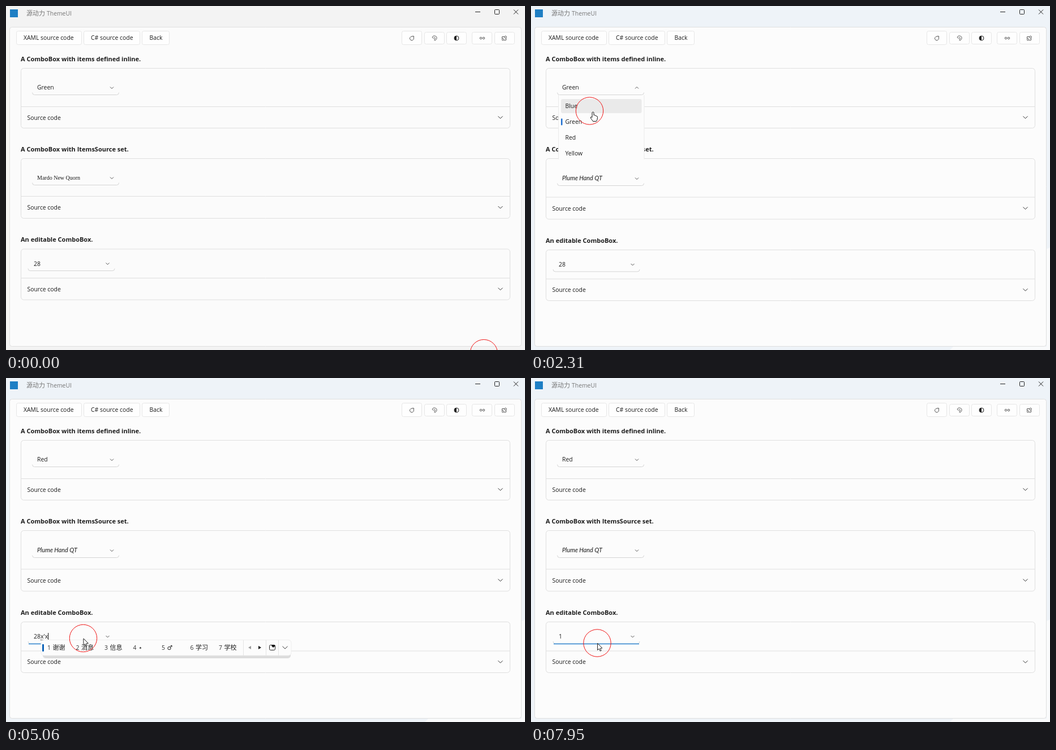
Animation, 917 px wide and 610 px high, one loop 8000 ms. Source, as an HTML page with a canvas:

```html
<!DOCTYPE html>
<html lang="en">
<head>
<meta charset="utf-8">
<title>ComboBox demo</title>
<style>
html, body { margin: 0; width: 100%; height: 100%; overflow: hidden; background: #f3f3f3; }
canvas { display: block; width: 917px; height: 610px; }
</style>
</head>
<body>
<canvas id="stage" width="917" height="610"></canvas>
<script>
const ctx = document.getElementById('stage').getContext('2d');
const LOOP = 8000;
const UI = '10.4px "Open Sans", sans-serif';
const BOLD = 'bold 11px "Open Sans", sans-serif';
const CJK = '11px "Noto Sans CJK SC", "Noto Sans CJK", sans-serif';
const SERIF = '10px "Liberation Serif", serif';
const SCRIPT = 'italic 10.8px Lato, sans-serif';
const INK = '#1c1c1c', LINE = '#dfdfdf', BLUE = '#2f87d3';

const colors = ['Blue', 'Green', 'Red', 'Yellow'].map(s => ({ s, font: UI }));
const fonts = [
  { s: 'Ovald', font: UI },
  { s: 'Plume Hand QT', font: SCRIPT },
  { s: 'Tallow Code', font: '10px "Liberation Mono", monospace' },
  { s: 'Kestra UI', font: UI },
  { s: 'Mardo New Quorn', font: SERIF }
];

// time, x, y of the pointer
const path = [
  [0, 845, 616], [200, 700, 556], [450, 300, 385], [680, 125, 309], [820, 116, 312],
  [1040, 108, 367], [1120, 108, 364], [1350, 113, 240], [1600, 113.5, 142.5],
  [1800, 113.5, 142.5], [2050, 108, 168], [2310, 103.5, 186], [2540, 104, 184],
  [2800, 115, 153], [2880, 114, 156], [3100, 104, 215], [3300, 101, 242], [3400, 101, 241],
  [3650, 118, 350], [3950, 135, 460], [4160, 132, 510], [4500, 130, 488],
  [5060, 136.5, 461.5], [5480, 118, 458], [5820, 18, 449], [6070, 18, 449],
  [6500, 62, 465], [6830, 99, 475], [6880, 101, 477.5], [7080, 119, 483],
  [7280, 119, 483], [7600, 118, 474], [7950, 117, 470], [8000, 117, 470]
];

// hover: [from time, row] pairs
const popups = [
  { y: 317, open: 730, close: 1080, items: fonts, pick: 4, hover: [[0, 4], [930, 0], [990, 1]] },
  { y: 157, open: 1740, close: 2550, items: colors, pick: 1, hover: [[0, 1], [2000, 0]] },
  { y: 157, open: 2830, close: 3420, items: colors, pick: 0, hover: [[0, 0], [3040, 1], [3190, 2]] }
];

const clamp = v => Math.max(0, Math.min(1, v));

function at(t) {
  let i = 1;
  while (i < path.length - 1 && path[i][0] < t) i++;
  const [t0, x0, y0] = path[i - 1], [t1, x1, y1] = path[i];
  const p = clamp((t - t0) / (t1 - t0));
  return { x: x0 + (x1 - x0) * p, y: y0 + (y1 - y0) * p };
}

function text(s, x, y, font = UI, color = INK) {
  ctx.font = font;
  ctx.fillStyle = color;
  ctx.fillText(s, x, y);
}

function line(points, color = LINE, width = 1) {
  ctx.beginPath();
  points.forEach(([x, y]) => ctx.lineTo(x, y));
  ctx.strokeStyle = color;
  ctx.lineWidth = width;
  ctx.stroke();
}

function box(x, y, w, h, r, fill, stroke) {
  ctx.beginPath();
  ctx.roundRect(x, y, w, h, r);
  if (fill) { ctx.fillStyle = fill; ctx.fill(); }
  if (stroke) { ctx.strokeStyle = stroke; ctx.lineWidth = 1; ctx.stroke(); }
}

function ring(x, y, r, color, width = 1, from = 0, to = Math.PI * 2) {
  ctx.beginPath();
  ctx.arc(x, y, r, from, to);
  ctx.strokeStyle = color;
  ctx.lineWidth = width;
  ctx.stroke();
}

function poly(points, fill, stroke) {
  ctx.beginPath();
  points.forEach(([x, y]) => ctx.lineTo(x, y));
  ctx.closePath();
  if (fill) { ctx.fillStyle = fill; ctx.fill(); }
  if (stroke) { ctx.strokeStyle = stroke; ctx.lineWidth = 1; ctx.stroke(); }
}

function chevron(x, y, w, h, color = '#444') {
  line([[x - w, y - h], [x, y + h], [x + w, y - h]], color);
}

function drawWindow(active) {
  ctx.fillStyle = active ? '#eef3f8' : '#f3f3f3';
  ctx.fillRect(0, 0, 917, 610);
  if (active) poly([[917, 428], [911, 431], [911, 604], [746, 604], [740, 610], [917, 610]], '#f9fafb');
  box(6.5, 37.5, 904, 566, 4, active ? '#fcfcfc' : '#fbfbfb', LINE);

  ctx.fillStyle = '#1f7fc4';
  ctx.fillRect(7, 6, 14, 14);
  text('源动力', 36, 17, CJK, '#777');
  text('ThemeUI', 72, 16.5, UI, '#777');
  line([[829, 10.5], [838, 10.5]], '#222');
  box(863.5, 6.5, 8, 8, 1, null, '#222');
  line([[897, 6.5], [905, 14.5]], '#222');
  line([[905, 6.5], [897, 14.5]], '#222');
}

function drawToolbar() {
  const labels = [['XAML source code', 18.5, 115, 31], ['C# source code', 137.5, 99, 150], ['Back', 240.5, 48, 253.5]];
  for (const [s, x, w, tx] of labels) {
    box(x, 44.5, w, 24, 3, '#fefefe', '#e6e6e6');
    text(s, tx, 60);
  }
  [699.5, 739.5, 778.5, 823.5, 863.5].forEach((x, i) =>
    box(x, i ? 46.5 : 44.5, 35, i ? 21 : 24, 3, '#fefefe', '#e6e6e6'));

  const dark = '#555';
  ring(717, 57.5, 3.5, dark, 1, -0.5, 5);
  line([[717.5, 53.5], [720.5, 53.5], [720.5, 56]], dark);
  ring(757, 57, 4, dark, 1, -2.8, 1.7);
  ring(757, 57.5, 1.5, dark, 1, -2.5, 2.2);
  line([[753, 55.5], [755.5, 57.5]], dark);
  ring(796, 57, 4, '#222');
  ctx.beginPath();
  ctx.arc(796, 57, 4, Math.PI / 2, Math.PI * 1.5);
  ctx.fillStyle = '#222';
  ctx.fill();
  ring(839, 57, 1.7, dark);
  ring(844, 57, 1.7, dark);
  ring(882.5, 55, 1.8, dark);
  ring(878, 59.5, 1.6, dark);
  line([[880.5, 54.5], [876.5, 54.5], [876.5, 58]], dark);
  line([[880, 60.5], [883.5, 60.5], [883.5, 57]], dark);
}

function drawSection(title, y, top, split, bottom) {
  text(title, 26, y, BOLD);
  box(26.5, top, 864, bottom - top, 5, null, LINE);
  line([[27, split], [890, split]]);
  const mid = (split + bottom) / 2;
  text('Source code', 37.5, mid + 4);
  chevron(873.5, mid, 4, 2, '#333');
}

function drawCombo(x, bottom, flip = 1) {
  ctx.beginPath();
  ctx.moveTo(x, bottom - 4);
  ctx.quadraticCurveTo(x, bottom, x + 4, bottom);
  ctx.lineTo(x + 149, bottom);
  ctx.quadraticCurveTo(x + 153, bottom, x + 153, bottom - 4);
  ctx.strokeStyle = '#d5d5d5';
  ctx.lineWidth = 1;
  ctx.stroke();
  chevron(x + 140.5, bottom - 12.5, 3, 1.5 * flip, '#555');
}

const slide = (p, t) => clamp((t - p.open) / 200);

function drawPopup(p, t) {
  const rows = p.items.length, h = rows * 28 + 2;
  const dy = -h * Math.pow(1 - slide(p, t), 3);
  const hover = p.hover.filter(([from]) => from <= t).pop()[1];
  ctx.save();
  ctx.beginPath();
  ctx.rect(47, p.y + 1, 155, h);
  ctx.clip();
  box(48.5, p.y - 6 + dy, 151.5, h + 14, 4, '#fcfcfc', '#ebebeb');
  p.items.forEach((item, i) => {
    const y = p.y + 20.5 + i * 28 + dy;
    if (i === hover) box(53, y - 12.5, 142.5, 25, 3, '#eaeaea');
    if (i === p.pick) box(53, y - 6, 2.5, 12, 1, '#1f6fd0');
    text(item.s, 60.5, y + 3.7, item.font);
  });
  ctx.restore();
}

function drawIme(wide) {
  const right = wide ? 569 : 504, pitch = wide ? 59.8 : 50.5;
  box(65, 470, right - 66, 27, 5, '#dcdcdc');
  box(62, 464.5, right - 62, 27.5, 5, '#fcfcfc', '#eeeeee');
  box(64, 472, 3, 13, 1, '#0c62b8');
  ['谢谢', '消息', '信息', '⋆', '♂', '学习', '学校'].forEach((s, i) => {
    const x = 73 + i * pitch;
    text(i + 1, x, 482, UI, '#333');
    text(s, x + 9.5, 482, s.length > 1 ? CJK : '11px "DejaVu Sans", sans-serif');
  });
  for (const d of [84.5, 44.5, 22.5]) line([[right - d, 465], [right - d, 492]], '#e4e4e4');
  poly([[right - 76, 478], [right - 71, 475], [right - 71, 481]], '#999');
  poly([[right - 53, 478], [right - 58, 475], [right - 58, 481]], '#111');
  box(right - 38.5, 473.5, 10, 9, 2, null, '#222');
  poly([[right - 32, 478], [right - 35, 475], [right - 33.5, 473], [right - 32, 474],
    [right - 30.5, 473], [right - 28, 475]], '#111');
  chevron(right - 11, 478, 4.5, 2.2, '#333');
}

function drawEditor(t, dy) {
  const base = 460.8 + dy, bottom = 469.5 + dy;
  drawCombo(39, bottom);
  if (t >= 3980) line([[40, bottom + 0.5], [191, bottom + 0.5]], BLUE, 1.3);

  if (t >= 7280) {
    text('1', 49, base);
  } else if (t >= 6400) {
    box(54.5, base - 10, 6.5, 13, 0, '#92c7f0');
    text('10', 49, base);
  } else {
    if (t >= 5760) box(49, base - 10, 12, 13, 0, '#92c7f0');
    text('28', 49, base);
  }

  const typed = t < 4480 || t >= 5500 ? '' : t < 4760 ? 'x' : t < 5220 ? "x'x" : "x'x'x";
  if (!typed) return;
  text(typed, 61, base);
  const end = 61 + ctx.measureText(typed).width;
  ctx.setLineDash([2, 1]);
  line([[61, 464.5], [end, 464.5]], '#333');
  ctx.setLineDash([]);
  line([[end + 0.5, 452], [end + 0.5, 465]], '#111');
  drawIme(typed.length > 3);
}

function drawHand() {
  ctx.beginPath();
  ctx.moveTo(4, 10);
  ctx.lineTo(4, 2.5);
  ctx.quadraticCurveTo(5.5, -0.2, 7, 2.5);
  ctx.lineTo(7, 7);
  ctx.quadraticCurveTo(9, 6, 9.5, 8);
  ctx.quadraticCurveTo(11.2, 7, 11.8, 9);
  ctx.quadraticCurveTo(13.5, 8.6, 13.5, 11);
  ctx.quadraticCurveTo(13.5, 15, 11.5, 18);
  ctx.lineTo(5.5, 18);
  ctx.quadraticCurveTo(3.5, 15, 1, 11.5);
  ctx.quadraticCurveTo(1.5, 9, 4, 11);
  ctx.closePath();
  ctx.fillStyle = '#fff';
  ctx.fill();
  ctx.strokeStyle = '#111';
  ctx.lineWidth = 1;
  ctx.stroke();
}

function drawPointer(t, popup) {
  const { x, y } = at(t);
  ring(x, y, 24.2, '#f01414', 1);
  ctx.save();
  ctx.translate(x + 0.5, y + 0.5);
  if (popup && y > popup.y + 8) drawHand();
  else poly([[0, 0], [0, 12], [2.8, 9.6], [4.7, 13.7], [6.6, 12.8], [4.8, 8.9], [8.4, 8.5]], '#fff', '#222');
  ctx.restore();
}

function draw(t) {
  const changed = t >= 1080, dy = changed ? 1.5 : 0;
  const popup = popups.find(p => t >= p.open && t < p.close);
  const flip = y => popup && popup.y === y ? 1 - 2 * slide(popup, t) : 1;

  drawWindow(t >= 870);
  drawToolbar();
  drawSection('A ComboBox with items defined inline.', 98, 110.5, 178.5, 216.5);
  drawSection('A ComboBox with ItemsSource set.', 258, 270.5, 337.5 + dy, 376.5 + dy);
  drawSection('An editable ComboBox.', 418 + dy, 431 + dy, 482.5 + dy, 521 + dy);

  drawCombo(46.5, 157.5, flip(157));
  text(t < 2550 ? 'Green' : t < 3420 ? 'Blue' : 'Red', 55, 148);
  drawCombo(46.5, changed ? 318.5 : 317.5, flip(317));
  const font = fonts[changed ? 1 : 4];
  text(font.s, 55, changed ? 309 : 307.5, font.font);
  drawEditor(t, dy);

  if (popup) drawPopup(popup, t);
  drawPointer(t, popup);
}

function tick() {
  draw(performance.now() % LOOP);
  requestAnimationFrame(tick);
}
tick();
</script>
</body>
</html>
```
